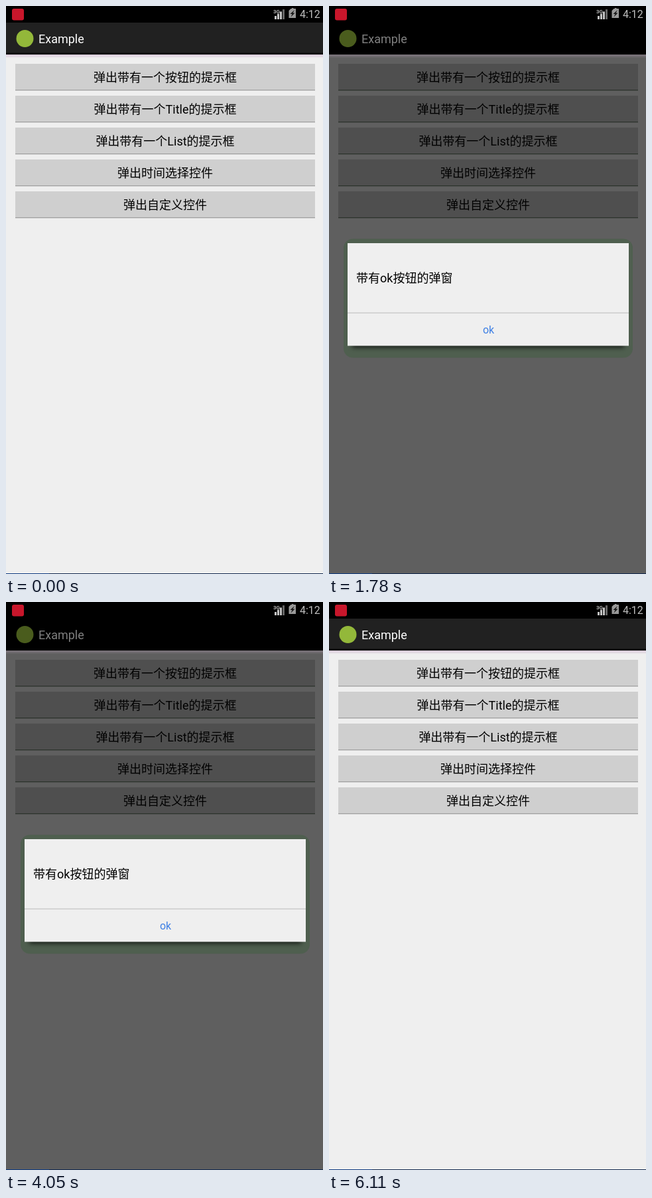
Animation of 478x855 px, one loop 6140 ms. Source, as an HTML page:

```html
<!DOCTYPE html>
<html lang="zh-CN">
<head>
<meta charset="utf-8">
<title>Example</title>
<style>
  html, body { margin: 0; width: 100%; height: 100%; overflow: hidden; background: #000; }
  svg { display: block; width: 478px; height: 855px; }
  text { font-family: Roboto, "Noto Sans CJK SC", "Noto Sans CJK", sans-serif; font-size: 18px; }
  .mid { text-anchor: middle; }
</style>
</head>
<body>
<svg viewBox="0 0 478 855" xmlns="http://www.w3.org/2000/svg">
  <defs>
    <filter id="soft" x="-10%" y="-20%" width="120%" height="140%">
      <feGaussianBlur stdDeviation="3.5"/>
    </filter>
  </defs>
  <rect id="page" width="478" height="855"/>

  <g id="status">
    <rect width="478" height="25" fill="#000"/>
    <rect x="9" y="4" width="18" height="17.5" rx="3" fill="#c8162b"/>
    <text x="403" y="11" fill="#d0d0d0" style="font-size:8px;font-weight:500">3G</text>
    <g id="signal"></g>
    <path d="M429.500 4h1.500v-1h2.500v1h3.500v14h-10.500v-11z" fill="#999"/>
    <path d="M435 6l-6.500 6h3l-2 4.500 6-6h-3z" fill="#151515"/>
    <text x="443" y="18" fill="#bdbdbd" style="font-size:16px">4:12</text>
  </g>

  <rect id="bar" y="25" width="478" height="46"/>
  <rect y="70.500" width="478" height="2.500" fill="#000"/>
  <rect id="lip" y="73" width="478" height="3"/>
  <rect id="lip2" y="76" width="478" height="2" opacity=".4"/>
  <g id="head">
    <circle cx="28.500" cy="49" r="13" fill="#93b83a"/>
    <text x="49" y="56" fill="#fff">Example</text>
  </g>

  <g id="buttons"></g>

  <g id="dialog">
    <rect id="halo"/>
    <rect x="35" y="385" width="410" height="129" fill="#000" opacity=".72" filter="url(#soft)"/>
    <rect x="28" y="357" width="424" height="154.500" fill="#efefef"/>
    <text x="41" y="416">带有ok按钮的弹窗</text>
    <rect x="28" y="461" width="424" height="2" fill="#d4d4d4"/>
    <rect id="press" x="28" y="463" width="424" height="48.500" fill="#6f9fef"/>
    <text id="ok" class="mid" x="240.500" y="493" style="font-size:16px">ok</text>
  </g>

  <rect y="854" width="478" height="1" fill="#12284f"/>
  <rect y="854" width="65" height="1" fill="#0f3a80"/>
</svg>
<script>
const LOOP = 6140;
const $ = id => document.getElementById(id);

function add(parent, tag, attrs, label) {
  const el = document.createElementNS("http://www.w3.org/2000/svg", tag);
  for (const k in attrs) el.setAttribute(k, attrs[k]);
  if (label) el.textContent = label;
  parent.appendChild(el);
  return el;
}

const set = (id, key, value) => $(id).setAttribute(key, value);

for (let i = 0; i < 4; i++) {
  const h = 5 + i * 3.3;
  add($("signal"), "rect", {
    x: 405 + i * 4, y: 20 - h, width: 3, height: h, fill: i < 3 ? "#c4c4c4" : "#666"
  });
}

const labels = ["弹出带有一个按钮的提示框", "弹出带有一个Title的提示框",
  "弹出带有一个List的提示框", "弹出时间选择控件", "弹出自定义控件"];
const faces = [], edges = [];
labels.forEach((label, i) => {
  const y = 87 + i * 48, g = $("buttons");
  faces.push(add(g, "rect", { x: 14, y, width: 452, height: 40 }));
  edges.push(add(g, "rect", { x: 14, y: y + 39, width: 452, height: 1.3 }));
  add(g, "text", { class: "mid", x: 240, y: y + 27 }, label);
});

// Shades of the screen behind the dialog
const shade = (page, face, edge, bar, lip, halo, ink, grow) =>
  ({ page, face, edge, bar, lip, halo, ink, grow });
const shades = {
  clear: shade("#efefef", "#cfcfcf", "#9f9f9f", "#212121", "#dfd3df", "#dfebdf", 1, 1),
  faint: shade("#cfdfcf", "#afafaf", "#808080", "#111111", "#c3b9c3", "#cfcfcf", .88, 6),
  light: shade("#bfbfbf", "#a3a3a3", "#7a7a7a", "#181818", "#b8aeb8", "#afbfaf", .82, 6),
  half: shade("#9f9f9f", "#878787", "#606060", "#0c0c0c", "#a09aa0", "#7f8f7f", .7, 6),
  dusk: shade("#7f7f7f", "#5f5f5f", "#464646", "#111111", "#8c878c", "#6f7f6f", .63, 6),
  dark: shade("#5f5f5f", "#4f4f4f", "#2c332c", "#000000", "#767076", "#4f5f4f", .5, 6)
};

// start, shade, dialog opacity, ok pressed
const steps = [
  [0, "clear", 0],
  [1200, "clear", .2], [1260, "clear", .45], [1320, "clear", .7], [1380, "clear", 1],
  [1440, "faint", 1], [1580, "half", 1], [1780, "dark", 1],
  [2480, "dark", 1, true], [2580, "dark", .45, true],
  [2780, "dusk", 0], [3080, "light", 0], [3180, "clear", 0],
  [3750, "clear", 1], [3950, "half", 1], [4050, "dark", 1],
  [4950, "dark", 1, true], [5020, "dark", .45, true],
  [5280, "dusk", 0], [5380, "light", 0], [5480, "clear", 0]
];

function render(t) {
  const [, name, alpha, pressed] = steps.filter(s => s[0] <= t).pop();
  const s = shades[name];
  set("page", "fill", s.page);
  set("bar", "fill", s.bar);
  set("lip", "fill", s.lip);
  set("lip2", "fill", s.lip);
  set("head", "opacity", s.ink);
  faces.forEach(el => el.setAttribute("fill", s.face));
  edges.forEach(el => el.setAttribute("fill", s.edge));

  const g = s.grow;
  set("halo", "x", 28 - g);
  set("halo", "y", 356.5 - g);
  set("halo", "width", 424 + 2 * g);
  set("halo", "height", 167 + 2 * g);
  set("halo", "rx", 14);
  set("halo", "fill", s.halo);
  set("dialog", "opacity", alpha);
  set("press", "opacity", pressed ? 1 : 0);
  set("ok", "fill", pressed ? "#fff" : "#3f80e4");
}

const origin = performance.now();
function tick() {
  render((performance.now() - origin) % LOOP);
  requestAnimationFrame(tick);
}
tick();
</script>
</body>
</html>
```
